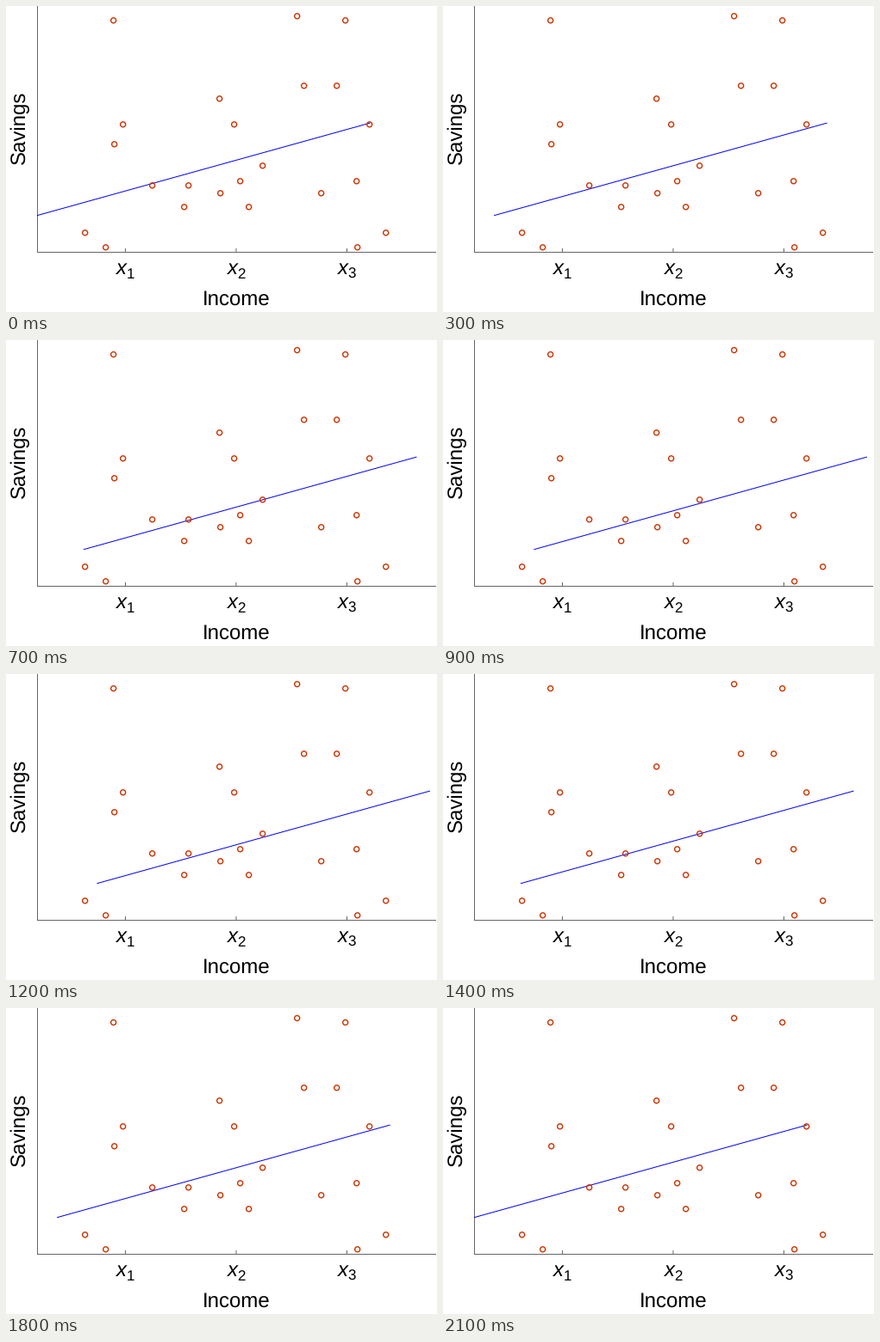
Recreate the animation shown at these times as a matplotlib script. Size 500 by 356 pixels, loop 2200 ms.

```python
import matplotlib.pyplot as plt
from matplotlib.animation import FuncAnimation
from matplotlib.patches import Circle

W, H, DPI = 500, 356, 100
PX = 72 / DPI  # points per pixel
AXIS, DOT, FIT = "#666666", "#cc3300", "#0000ff"

LEFT, BASE = 36.5, 286.5  # axis lines
UNIT = 128.5  # distance between ticks
FRAMES, STEPS, STEP = 22, 10, 0.06 * UNIT

# Households that share a savings level, by income position.
ROWS = {
    12: [338],
    17: [125, 394],
    93: [346, 384],
    108: [248],
    138: [136, 265, 422],
    161: [126],
    186: [298],
    204: [272, 407],
    209: [170, 212],
    218: [249, 366],
    234: [207, 282],
    264: [92, 441],
    281: [116, 408],
}

plt.rcParams.update({"font.family": "Liberation Sans", "text.hinting": "none"})
fig = plt.figure(figsize=(W / DPI, H / DPI), dpi=DPI, facecolor="white")
ax = fig.add_axes([0, 0, 1, 1])
ax.set(xlim=(0, W), ylim=(H, 0))
ax.axis("off")


def rule(xs, ys):
    ax.plot(xs, ys, color=AXIS, lw=PX, solid_capstyle="butt", snap=False,
            zorder=1)


def label(x, y, text, size=24, **style):
    ax.text(x, y, text, fontsize=size * PX, color="black", ha="left",
            va="baseline", rotation_mode="anchor", **style)


rule([LEFT, LEFT], [0, BASE + 0.5])
rule([LEFT - 0.5, 499], [BASE, BASE])
for i in range(3):
    x = 138.5 + UNIT * i
    rule([x, x], [BASE - 4.5, BASE - 0.5])
    label(x - 10.3, 312, "x", style="italic")
    label(x + 0.8, 317, str(i + 1), 17)

label(228.2, 348, "Income")
label(22, 184.2, "Savings", rotation=90)

for y, xs in ROWS.items():
    for x in xs:
        ax.add_patch(Circle((x - 0.3, y - 0.2), 3, fill=False, ec=DOT,
                            lw=1.4 * PX, snap=False, zorder=3))

fit, = ax.plot([], [], color=FIT, lw=PX, solid_capstyle="projecting", zorder=2)


def update(frame):
    # Slide right, rest for one extra frame, then slide back.
    x = LEFT + STEP * min(frame, FRAMES - 1 - frame, STEPS)
    fit.set_data([x, x + 3 * UNIT], [243.6, 136.2])
    return fit,


anim = FuncAnimation(fig, update, frames=FRAMES, interval=100, repeat=True)
plt.show()
```
